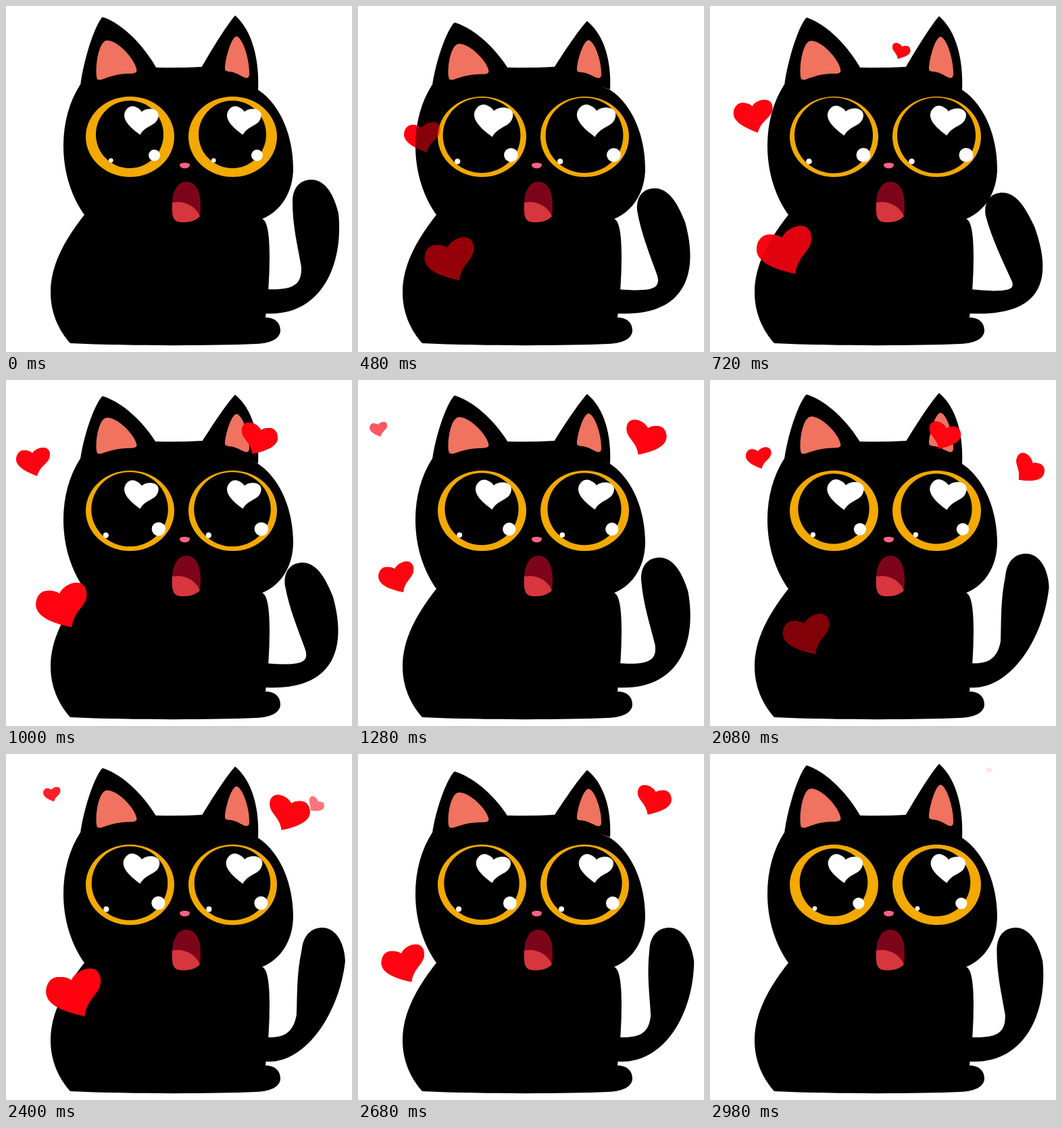
An HTML page with a canvas that plays this animation: 512 by 512 pixels, repeating every 3000 ms.

```html
<!DOCTYPE html>
<html lang="en">
<head>
<meta charset="utf-8">
<title>Amazed cat</title>
<style>
  html, body { margin: 0; width: 100%; height: 100%; overflow: hidden; background: #fff; }
  canvas { display: block; }
</style>
</head>
<body>
<canvas id="stage" width="512" height="512"></canvas>
<script>
const LOOP = 3000;
const ctx = document.getElementById('stage').getContext('2d');

const body = new Path2D(`M110 116 C94 141 85 172 85 207 C85 248 98 284 116 309
  C86 347 66 384 66 424 C66 454 78 480 95 499 C180 503 300 503 370 500
  C396 499 406 490 406 480 C406 468 397 461 384 461 C388 430 390 400 390 370
  C390 345 388 318 379 315 C407 304 425 275 425 240 C425 197 409 148 373 124
  L290 90 Q256 92 223 91 Z`);

const ears = [
  ['M110 118 C115 80 130 32 142 17 Q143 16 145 17 C175 28 205 60 224 94 Z',
   `M134 104 C132 85 138 52 149 51 C165 50 190 78 193 93 C195 99 190 100 184 100
    C165 100 155 104 141 109 C136 110 134 108 134 104 Z`],
  ['M288 93 C300 72 325 30 339 14 C365 37 375 80 373 125 Z',
   `M324 93 C324 80 333 46 341 45 C350 46 361 80 360 102 C359 108 355 107 351 105
    C342 100 336 97 329 97 C325 96 324 95 324 93 Z`]
].map(pair => pair.map(d => new Path2D(d)));

const nose = new Path2D('M257 235 C257 231 272 231 272 235 C272 242 257 242 257 235 Z');
const mouth = new Path2D(`M246 291 C247 272 255 260 267 260 C281 260 289 275 288 300
  C288 316 275 320 261 320 C247 320 245 312 246 291 Z`);
const tongue = new Path2D(`M246 291 C262 287 280 295 287 311 C280 319 270 320 261 320
  C247 320 245 312 246 291 Z`);

// Leaning heart, 83 units wide, centred on 0,0
const heart = new Path2D(`M17 36 C-6 31 -40 22 -41 0 C-41 -14 -33 -23 -22 -23
  C-12 -23 -6 -21 -3 -18 C1 -28 14 -36 25 -36 C36 -36 42 -27 41 -15
  C40 2 20 10 17 36 Z`);

// Bézier points of the tail at rest
const tail = [[425, 421], [438, 413], [437, 386], [432, 357], [424, 326], [424, 290],
  [424, 266], [438, 257], [452, 257], [475, 257], [487, 285], [492, 307],
  [500, 385], [465, 460]];

// Each heart flies along a quadratic curve; fade is the share of the flight spent appearing
const low = { path: [[190, 370], [98, 408], [36, 245]], size: 82, fade: 0.54 };
const high = { path: [[188, 242], [21, 182], [30, 50]], size: 57, fade: 0.65, turn: 8 };
const small = { path: [[138, 205], [30, 99], [80, 35]], size: 37, fade: 0.25, turn: 8 };
const arc = { path: [[240, 54], [515, 136], [410, 20]], size: 60, fade: 0.08, flip: -1 };
const side = { path: [[437, 245], [502, 115], [448, 62]], size: 46, fade: 0.08, flip: -1, turn: 20 };

const flights = [[high, 0, 1400], [low, 0, 1520], [arc, 620, 1830], [small, 1650, 2560],
  [low, 1750, 2960], [side, 1640, 2500], [arc, 1800, 3000]];

const clamp = v => Math.max(0, Math.min(1, v));
const mix = (a, b, k) => a + (b - a) * k;
const triangle = phase => 1 - Math.abs(1 - 2 * (phase % 1));

function fill(color, path) {
  ctx.fillStyle = color;
  ctx.fill(path);
}

function oval(color, x, y, rx, ry = rx) {
  ctx.fillStyle = color;
  ctx.beginPath();
  ctx.ellipse(x, y, rx, ry, 0, 0, Math.PI * 2);
  ctx.fill();
}

function drawHeart(color, x, y, width, turn = 0, flip = 1) {
  ctx.save();
  ctx.translate(x, y);
  ctx.rotate(turn * Math.PI / 180);
  ctx.scale(flip * width / 83, width / 83);
  fill(color, heart);
  ctx.restore();
}

// Fading hearts look denser outside the cat, so they also get a layer behind it
function drawHearts(t, boost) {
  for (const [{ path, size, fade, turn, flip }, start, end] of flights) {
    if (t < start || t >= end) continue;
    const p = (t - start) / (end - start);
    const [x, y] = [0, 1].map(c =>
      mix(mix(path[0][c], path[1][c], p), mix(path[1][c], path[2][c], p), p));
    const out = 1 - Math.sqrt(1 - clamp((end - t) / 180));
    ctx.globalAlpha = clamp(boost * p / fade) * out;
    drawHeart('#ff0311', x, y, size * Math.sin(Math.PI * p) ** 0.6, turn, flip);
  }
  ctx.globalAlpha = 1;
}

// The tail leans around its bend and sags when it swings left
function drawTail(t) {
  const swing = triangle(t / 1500) * (t < 1500 ? 1 : -1);
  const points = tail.map(([x, y]) => [
    x - swing * Math.min(20, 0.27 * (353 - y)),
    y + 20 * Math.max(0, swing) * clamp((430 - y) / 45)
  ]);
  points.push([384, 455]);
  ctx.beginPath();
  ctx.moveTo(384, 419);
  for (let i = 0; i < points.length; i += 3) ctx.bezierCurveTo(...points.slice(i, i + 3).flat());
  ctx.fillStyle = '#000';
  ctx.fill();
}

function drawEars(t) {
  ctx.save();
  ctx.translate(0, 109);
  ctx.scale(1, 1 - 0.12 * triangle(t / 750));
  ctx.translate(0, -109);
  for (const [outer, inner] of ears) {
    fill('#000', outer);
    fill('#ef735f', inner);
  }
  ctx.restore();
}

// Pupils widen twice per loop: a long swell with a pause, then a short one
function pupilSize(t) {
  return t < 1850
    ? clamp(Math.min(t / 520, (1850 - t) / 1000))
    : clamp(Math.min((t - 1850) / 700, (LOOP - t) / 450));
}

function drawEye(dx, t) {
  const k = pupilSize(t);
  ctx.save();
  ctx.translate(dx, 0);
  oval('#f2a900', 183.5, 193.5, 65.5, 59.5);
  oval('#000', 183, mix(190, 191.5, k), mix(50, 58, k), mix(50, 56, k));
  oval('#fff', mix(219.5, 227, k), mix(221, 220.5, k), mix(8.5, 10.5, k));
  oval('#fff', mix(155.3, 146.5, k), mix(228.5, 230, k), mix(3.3, 4.3, k));
  drawHeart('#fff', 198, 167, 49 + 7.5 * triangle(t * 9 / LOOP), 24);
  ctx.restore();
}

function draw(now) {
  const t = now % LOOP;
  ctx.fillStyle = '#fff';
  ctx.fillRect(0, 0, 512, 512);
  drawHearts(t, 2);
  drawTail(t);
  fill('#000', body);
  drawEars(t);
  drawEye(0, t);
  drawEye(152, t);
  fill('#fb6284', nose);
  fill('#7d0519', mouth);
  fill('#d7363e', tongue);
  drawHearts(t, 1);
}

const begin = performance.now();
function tick() {
  draw(performance.now() - begin);
  requestAnimationFrame(tick);
}
tick();
</script>
</body>
</html>
```
